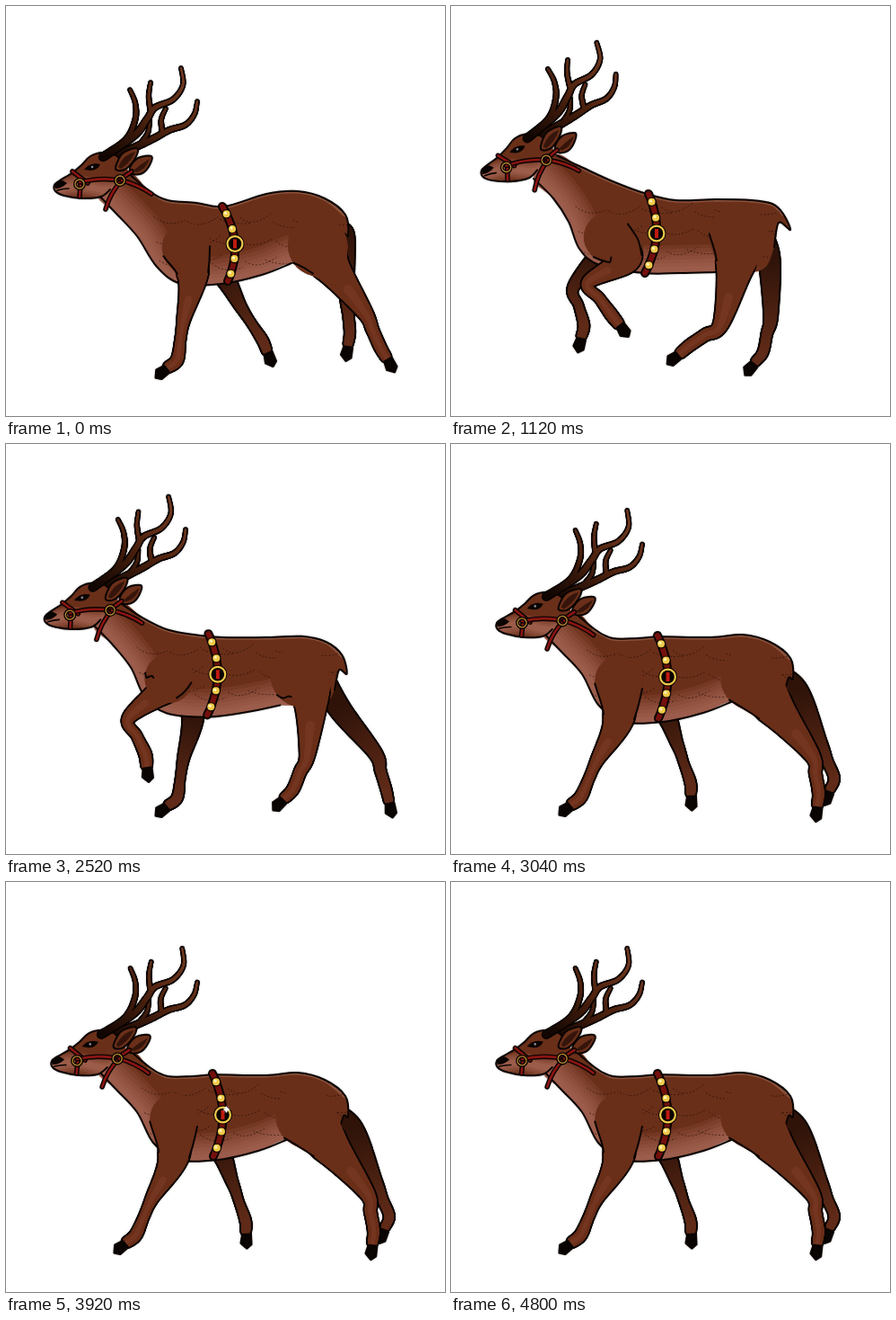
These frames come from a looping animation (489 px wide and 456 px high, 4840 ms). An HTML page with a canvas:

```html
<!DOCTYPE html>
<html lang="en">
<head>
<meta charset="utf-8">
<title>Running reindeer</title>
<style>
html, body { margin: 0; width: 100%; height: 100%; overflow: hidden; background: #fff; }
canvas { display: block; width: 489px; height: 456px; filter: drop-shadow(0 0 1px rgba(60, 40, 30, .3)); }
</style>
</head>
<body>
<canvas id="stage" width="489" height="456"></canvas>
<script>
const ctx = document.getElementById('stage').getContext('2d');
const STEP = 40, STRIDE = 11, LOOP = 121, GATHERED = 6;
const COAT = '#6a2f19', INK = '#0a0402', RED = '#8c1512', GOLD = '#f0c94a';

const pts = s => s.split(' ').map(p => p.split(',').map(Number));
const mix = (p, q, t) => p.map((v, i) => v + (q[i] - v) * t);
const mixAll = (a, b, t) => a.map((p, i) => mix(p, b[i], t));

// Body poses: trunk outline, girth ends and head [x, y, degrees].
const push = {
  trunk: pts('135,185 160,206 180,216 212,219 243,223 290,209 325,206 355,214 378,232 381,255 376,254 371,272 360,290 318,286 285,299 240,309 195,309 168,290 146,256 122,230 103,210'),
  girth: pts('241,223 247,306'),
  head: [55, 200, 0]
};
const gather = {
  trunk: pts('115,165 143,178 180,195 215,208 250,216 295,215 335,216 358,220 370,231 378,249 365,241 360,268 345,294 295,296 255,297 215,297 165,288 143,270 131,240 114,214 92,192'),
  girth: pts('220,209 216,297'),
  head: [35, 184, -5.3]
};
// Landing stretches the trunk: withers rise, croup sinks, belly slides forward.
const reach = {
  trunk: push.trunk.map(([x, y]) => {
    const back = y < 280, rise = back * Math.exp(-(((x - 238) / 25) ** 2));
    return [x - 10 * rise - 4 * !back, y - 9 * rise + 6 * (back && x > 270)];
  }),
  girth: pts('230,213 231,305'),
  head: [52, 200, 1.9]
};

// One gait cycle per pair: phase, root x, root y, then the angle of each bone from straight down.
// The far leg runs the same cycle ahead of the near one.
const fore = {
  lead: 3, shift: 0, top: [-54, 4], farTop: [8, 18],
  bones: [50, 44, 28], girths: [28, 16, 7, 5.6, 6.6, 6],
  gait: pts('0,208,301,-12,-9,-50 2,232,289,24,19,3 3,236,292,31,33,22 4.5,215,280,-15,60,55 6,195,281,-58,36,38 9,170,275,-42,15,-12 10,186,308,-28,-24,-50')
};
const hind = {
  lead: 2.5, shift: 8, top: [92, 2], farTop: [20, -8],
  bones: [64, 42, 29], girths: [34, 20, 8.5, 6.6, 6.4, 5.8],
  gait: pts('0,362,289,36,24,30 1,366,284,38,40,34 1.5,377,274,24,22,-20 2.5,368,257,3,5,-8 4.2,338,274,-32,12,-15 6,316,292,-14,-56,-50 8.5,346,280,2,-12,-38 10,363,296,38,10,-6')
};

const antlers = [
  ['213,106 210,120 200,132 182,138 165,147 146,156 122,167', '178,114 173,126 174,139', '160,127 158,141 150,153'],
  ['195,69 197,88 186,104 166,113 157,126 143,144 108,168', '161,85 159,100 161,116', '138,93 144,108 144,126 134,148 108,168']
].map(set => set.map(pts));

// Smooth path through points.
function spline(p, closed) {
  const n = p.length, at = i => closed ? p[(i + n) % n] : p[Math.max(0, Math.min(n - 1, i))];
  const path = new Path2D();
  path.moveTo(...p[0]);
  for (let i = 0; i < (closed ? n : n - 1); i++) {
    const [a, b, c, d] = [at(i - 1), at(i), at(i + 1), at(i + 2)];
    path.bezierCurveTo(b[0] + (c[0] - a[0]) / 6, b[1] + (c[1] - a[1]) / 6,
      c[0] - (d[0] - b[0]) / 6, c[1] - (d[1] - b[1]) / 6, c[0], c[1]);
  }
  if (closed) path.closePath();
  return path;
}

function line(path, color, width) {
  ctx.strokeStyle = color;
  ctx.lineWidth = width;
  ctx.stroke(path);
}

function fill(path, color) {
  ctx.fillStyle = color;
  ctx.fill(path);
}

function circle(x, y, r) {
  const path = new Path2D();
  path.arc(x, y, r, 0, 7);
  return path;
}

// Dense samples [x, y, half-width] along a chain of joints.
function sample(j) {
  const out = [], n = j.length, per = 20;
  for (let k = 0; k <= (n - 1) * per; k++) {
    const i = Math.min(n - 2, Math.floor(k / per)), t = k / per - i;
    const q = [-1, 0, 1, 2].map(o => j[Math.max(0, Math.min(n - 1, i + o))]);
    out.push([0, 1, 2].map(c => {
      const [a, b, d, e] = q.map(v => v[c]);
      return b + t * ((d - a) / 2 + t * (a - 2.5 * b + 2 * d - e / 2 + t * (1.5 * (b - d) + (e - a) / 2)));
    }));
  }
  return out;
}

function tube(s, from, grow, color, scale = 1) {
  ctx.strokeStyle = color;
  for (let i = from + 1; i < s.length; i++) {
    ctx.lineWidth = 2 * (s[i][2] * scale + grow);
    ctx.beginPath();
    ctx.moveTo(s[i - 1][0], s[i - 1][1]);
    ctx.lineTo(s[i][0], s[i][1]);
    ctx.stroke();
  }
}

// Outline of one side of a limb between two samples.
function edge(s, from, to, side) {
  const out = [];
  for (let i = from; i <= to; i += 4) {
    const a = s[i - 1], b = s[i + 1], d = Math.hypot(b[0] - a[0], b[1] - a[1]) || 1;
    out.push([s[i][0] + side * (a[1] - b[1]) / d * s[i][2], s[i][1] + side * (b[0] - a[0]) / d * s[i][2]]);
  }
  line(spline(out), INK, 2);
}

function hoof(a, b) {
  const d = Math.hypot(b[0] - a[0], b[1] - a[1]);
  const ux = (b[0] - a[0]) / d, uy = (b[1] - a[1]) / d;
  const path = new Path2D();
  for (const [back, w] of [[12, 4], [3, 6], [-3, 0], [1, -5], [12, -5]])
    path.lineTo(b[0] - ux * back - uy * w, b[1] - uy * back + ux * w);
  path.closePath();
  fill(path, INK);
  line(path, INK, 3);
}

// Cyclic cubic through the gait keys.
function gaitAt(keys, phase) {
  const n = keys.length, p = phase % STRIDE;
  const at = i => {
    const [t, ...v] = keys[(i + n) % n];
    return { t: t + STRIDE * Math.floor(i / n), v };
  };
  const i = keys.findLastIndex(k => k[0] <= p);
  const [a, b, c, d] = [i - 1, i, i + 1, i + 2].map(at);
  const span = c.t - b.t, t = (p - b.t) / span;
  return b.v.map((v, k) => {
    const m = (c.v[k] - a.v[k]) / (c.t - a.t) * span, q = (d.v[k] - v) / (d.t - b.t) * span;
    const rise = c.v[k] - v;
    return v + t * (m + t * (3 * rise - 2 * m - q + t * (m + q - 2 * rise)));
  });
}

function leg(kind, step, buckle, near) {
  const { lead, shift, top, farTop, bones, girths, gait } = kind;
  const [x, y, ...angles] = gaitAt(gait, near ? step : step + lead);
  const joints = [[x + (near ? 0 : shift), y]];
  angles.forEach((deg, i) => {
    const a = deg * Math.PI / 180, [px, py] = joints[i];
    joints.push([px + bones[i] * Math.sin(a), py + bones[i] * Math.cos(a)]);
  });
  const [root, hock, foot, toe] = joints;
  const start = top.map((v, i) => buckle[i] + v + (near ? 0 : farTop[i]));
  const chain = [start, root, hock, mix(hock, foot, .5), foot, mix(foot, toe, .45)];
  const s = sample(chain.map((p, i) => [...p, near ? girths[i] : Math.min(12, girths[i] * .9)]));
  if (near) {
    tube(s, 16, 1.5, INK);
    tube(s, 0, -.4, COAT);
    tube(s, 30, 0, '#743621', .4);
    edge(s, 2, 18, 1);
    if (kind === fore) edge(s, 6, 18, -1);
  } else {
    const shade = ctx.createLinearGradient(...root, ...foot);
    shade.addColorStop(0, '#2f1309');
    shade.addColorStop(1, '#5f2a17');
    tube(s, 0, 1.4, INK);
    tube(s, 0, -.6, shade);
  }
  hoof(foot, toe);
}

function trunk(p, buckle) {
  const body = spline(p, true), belly = spline(p.slice(13)), back = spline(p.slice(1, 9));
  fill(body, COAT);
  ctx.save();
  ctx.clip(body);
  for (let w = 62; w > 10; w -= 8) line(belly, 'rgba(185,122,106,.12)', w);
  line(back, 'rgba(215,160,140,.3)', 5);
  ctx.translate(...buckle);
  ctx.setLineDash([1, 3]);
  for (let i = 0; i < 24; i++) {
    const x = -90 + (i % 8) * 31 + (i * 7 % 5) * 3, y = -30 + Math.floor(i / 8) * 23 + (i * 5 % 7);
    line(new Path2D(`M${x} ${y}q14 ${12 - i % 3 * 3} 34 ${i % 2 ? -5 : 4}`), 'rgba(25,8,3,.65)', 1);
  }
  ctx.restore();
  line(spline(p.slice(0, 12)), INK, 2);
  line(belly, INK, 2);
}

// Point on the bowed strap, 0 at the back and 1 at the belly.
function onGirth([a, b], u) {
  const [x, y] = mix(a, b, u);
  return [x + 44 * u * (1 - u), y];
}

function girth(bells, ends) {
  const strap = spline([ends[0], ...bells, ends[1]]);
  line(strap, INK, 10);
  line(strap, '#74100d', 6);
  bells.forEach(([x, y], i) => {
    if (i === 2) {
      fill(circle(x, y, 10.5), INK);
      line(circle(x, y, 8.4), GOLD, 2.2);
      ctx.fillStyle = '#c01a12';
      ctx.fillRect(x - 2, y - 5, 4, 10);
    } else {
      fill(circle(x, y, 5.2), INK);
      fill(circle(x, y, 4), GOLD);
      fill(circle(x - 1, y - 1, 1.6), '#fff3b8');
    }
  });
}

function antler(set) {
  const shade = ctx.createLinearGradient(190, 75, 115, 168);
  shade.addColorStop(0, '#70381f');
  shade.addColorStop(.5, '#4c210e');
  shade.addColorStop(1, '#120602');
  const limbs = set.map(p => sample(p.map(([x, y], i) => [x, y, 1.3 + i * .42])));
  limbs.forEach(s => tube(s, 0, 1.4, INK));
  limbs.forEach(s => tube(s, 0, -.3, shade));
}

function ear(points, inner) {
  const path = spline(pts(points), true);
  fill(path, COAT);
  line(path, INK, 2);
  fill(new Path2D(inner), '#35150b');
}

function strap(d) {
  const path = new Path2D(d);
  line(path, INK, 5.5);
  line(path, RED, 2.6);
}

function ring(x, y) {
  line(circle(x, y, 5), INK, 4);
  line(circle(x, y, 5), '#b98a30', 1.3);
}

function head([x, y, deg]) {
  ctx.save();
  ctx.translate(x, y);
  ctx.rotate(deg * Math.PI / 180);
  ctx.translate(-55, -200);
  antler(antlers[0]);
  ear('138,180 147,169 162,167 160,177 152,186 141,187', 'M142 183Q151 175 160 170Q156 182 145 185Z');
  const skull = spline(pts('134,178 122,166 108,163 94,167 84,177 73,186 60,194 54,199 55,206 65,211 85,214 106,212 116,204'));
  const mass = new Path2D(skull);
  mass.lineTo(140, 194);
  mass.closePath();
  fill(mass, COAT);
  ctx.save();
  ctx.clip(mass);
  const jaw = new Path2D('M52 207Q76 196 96 202T126 201');
  for (let w = 22; w > 4; w -= 5) line(jaw, 'rgba(195,130,112,.18)', w);
  ctx.restore();
  line(skull, INK, 2);
  fill(new Path2D('M54 200Q56 194 63 194L68 197Q62 203 55 203Z'), INK);
  line(new Path2D('M57 205Q64 203 70 203'), INK, 1.6);
  fill(new Path2D('M87 182Q94 173 105 176Q102 183 94 183Z'), INK);
  fill(circle(96, 179, 1.3), '#8c8c9a');
  antler(antlers[1]);
  ear('122,181 128,166 137,160 147,159 143,171 132,182', 'M125 179Q131 165 144 162Q139 174 128 181Z');
  ['M74 184L91 197', 'M83 198L82 212', 'M82 196Q106 190 127 194', 'M127 193L140 184',
    'M128 195Q116 208 111 226', 'M129 194Q148 199 162 209'].forEach(strap);
  ring(82, 198);
  ring(127, 194);
  ctx.restore();
}

function sparkle(x, y, r) {
  const glow = ctx.createRadialGradient(x, y, 0, x, y, r * 1.2);
  glow.addColorStop(0, 'rgba(255,255,255,.7)');
  glow.addColorStop(1, 'rgba(255,255,255,0)');
  fill(circle(x, y, r * 1.2), glow);
  const star = new Path2D(), k = r * .18;
  star.moveTo(x, y - r);
  for (const [dx, dy, cx, cy] of [[1, 0, 1, -1], [0, 1, 1, 1], [-1, 0, -1, 1], [0, -1, -1, -1]])
    star.quadraticCurveTo(x + cx * k, y + cy * k, x + dx * r, y + dy * r);
  fill(star, '#fff');
}

function draw(step) {
  const phase = step % STRIDE, turn = 2 * Math.PI / STRIDE;
  const base = phase > GATHERED ? reach : push;
  // Zero at both ends of the stride, one when gathered.
  const low = Math.cos(5 * turn);
  const g = (Math.cos((phase - 5) * turn) - low) / (Math.cos(turn) - low);
  const leap = 7 * Math.max(0, Math.sin(Math.PI * phase / GATHERED));

  const ends = mixAll(base.girth, gather.girth, g);
  const bells = [.1, .3, .5, .7, .9].map(u => onGirth(ends, u));
  const buckle = bells[2];

  ctx.clearRect(0, 0, 489, 456);
  ctx.lineCap = ctx.lineJoin = 'round';
  ctx.save();
  ctx.translate(0, -leap);
  leg(hind, phase, buckle);
  leg(fore, phase, buckle);
  trunk(mixAll(base.trunk, gather.trunk, g), buckle);
  leg(hind, phase, buckle, true);
  leg(fore, phase, buckle, true);
  girth(bells, ends);
  head(mix(base.head, gather.head, g));
  for (const [peak, [x, y]] of [[17, bells[1]], [101, [buckle[0] + 4, buckle[1] - 6]]]) {
    const size = 1 - Math.abs(step - peak) / 3.5;
    if (size > 0) sparkle(x, y, 26 * size);
  }
  ctx.restore();
}

let last = -1;
const start = performance.now();
function tick(now) {
  const step = Math.floor(Math.max(0, now - start) / STEP) % LOOP;
  if (step !== last) draw(last = step);
  requestAnimationFrame(tick);
}
draw(0);
requestAnimationFrame(tick);
</script>
</body>
</html>
```
